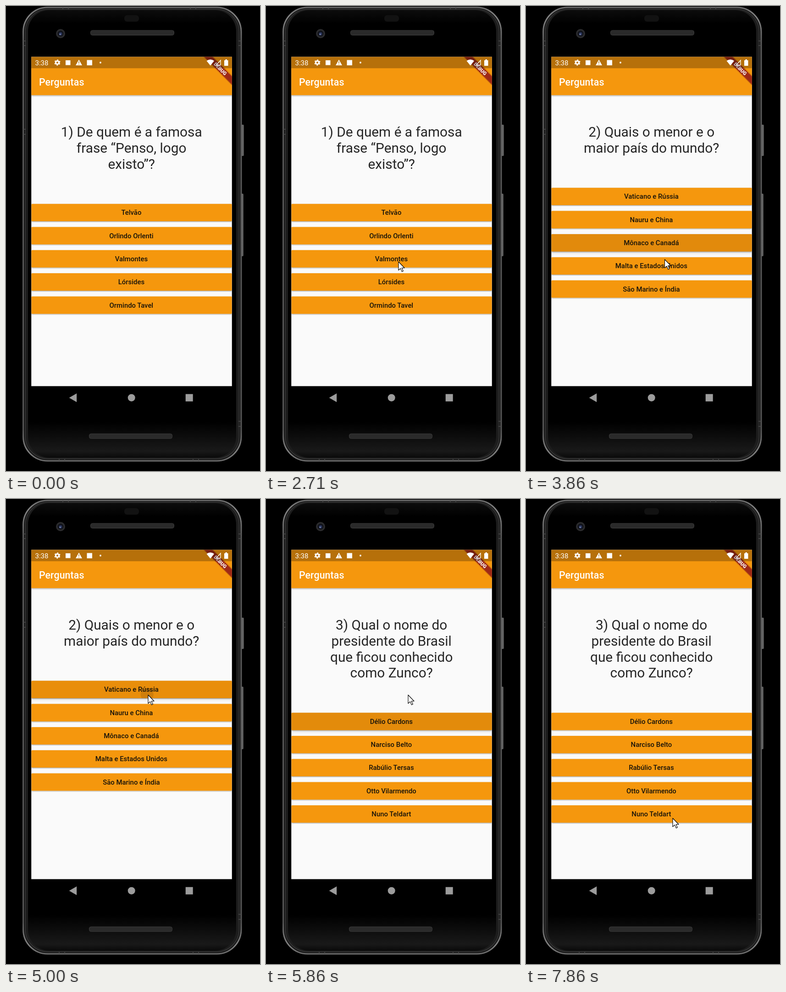
An HTML page for the animation above (8 s loop, 554 px wide and 1011 px high).

```html
<!DOCTYPE html>
<html lang="pt">
<head>
<meta charset="utf-8">
<title>Perguntas</title>
<style>
  html, body { margin: 0; width: 100%; height: 100%; overflow: hidden; background: #000; }
  svg { display: block; width: 554px; height: 1011px; font-family: Roboto, sans-serif; }
  .question { font-size: 29.8px; fill: #262626; text-anchor: middle; }
  .label { font-size: 14.9px; font-weight: 500; fill: #16120a; text-anchor: middle; }
</style>
</head>
<body>
<svg viewBox="0 0 554 1011">
  <defs>
    <linearGradient id="glass" x2="0" y2="1">
      <stop offset="0" stop-color="#0c0c0c"/><stop offset=".03" stop-color="#000"/>
      <stop offset=".92" stop-color="#000"/><stop offset=".985" stop-color="#191919"/>
      <stop offset="1" stop-color="#0a0a0a"/>
    </linearGradient>
    <linearGradient id="rim" x2="0" y2="1">
      <stop offset="0" stop-color="#6c6c6c"/><stop offset=".02" stop-color="#858585"/>
      <stop offset=".08" stop-color="#5c5c5c"/><stop offset=".93" stop-color="#565656"/>
      <stop offset=".98" stop-color="#808080"/><stop offset="1" stop-color="#6a6a6a"/>
    </linearGradient>
    <linearGradient id="key"><stop stop-color="#2c2c2c"/><stop offset=".6" stop-color="#6e6e6e"/><stop offset="1" stop-color="#4a4a4a"/></linearGradient>
    <pattern id="mesh" width="3" height="3" patternUnits="userSpaceOnUse">
      <rect width="3" height="3" fill="#303030"/><rect width="1.5" height="1.5" fill="#181818"/>
    </pattern>
    <clipPath id="screen"><rect x="55.2" y="110.6" width="437.6" height="716"/></clipPath>
    <filter id="barShadow" x="-5%" y="-20%" width="110%" height="150%"><feDropShadow dx="0" dy="1.5" stdDeviation="1.8" flood-opacity=".32"/></filter>
    <filter id="flat" x="-5%" y="-30%" width="110%" height="170%"><feDropShadow dx="0" dy="1" stdDeviation="1.2" flood-opacity=".42"/></filter>
    <filter id="raised" x="-5%" y="-30%" width="110%" height="190%"><feDropShadow dx="0" dy="3" stdDeviation="3" flood-opacity=".4"/></filter>
    <filter id="soft"><feDropShadow dx="0" dy="0" stdDeviation="2.5" flood-opacity=".45"/></filter>
  </defs>

  <!-- phone body -->
  <g fill="url(#key)">
    <rect x="511" y="258" width="8" height="68" rx="2"/>
    <rect x="511" y="408" width="7" height="136" rx="2"/>
  </g>
  <rect x="37.5" y="3" width="475.5" height="986" rx="53" fill="#161616" stroke="url(#rim)" stroke-width="3"/>
  <rect x="42" y="7" width="466.5" height="977.5" rx="49" fill="#1d1d1d" stroke="#383838" stroke-width="1.5"/>
  <rect x="48" y="9" width="454" height="973" rx="46" fill="url(#glass)"/>
  <path stroke="#4c4c4c" stroke-width="1.5" d="M37 76h6M37 86h6M507 76h6M507 86h6M37 268h6M37 279h6M507 903h6M507 914h6M124 3v4M136 3v4M402 3v4M414 3v4M116 985v4M128 985v4M408 985v4M420 985v4"/>
  <rect x="258" y="20" width="32" height="14" rx="6" fill="#121212"/>
  <circle cx="119" cy="60" r="10" fill="#2b2b2d"/>
  <circle cx="119" cy="60" r="6.5" fill="#11131a"/>
  <circle cx="119" cy="60.5" r="3.5" fill="#29345a"/>
  <circle cx="118" cy="61.5" r="1.5" fill="#808cb0"/>
  <g fill="url(#mesh)" stroke="#3a3a3a">
    <rect x="184.5" y="53" width="182" height="10.5" rx="4"/>
    <rect x="181.5" y="930" width="181" height="10.5" rx="4"/>
  </g>

  <g clip-path="url(#screen)">
    <rect x="55" y="110" width="439" height="717" fill="#fafafa"/>
    <g id="content"></g>
    <rect x="55" y="105" width="439" height="88.8" fill="#f5970a" filter="url(#barShadow)"/>
    <text x="72" y="172.5" font-size="21.3" font-weight="500" fill="#fff" letter-spacing=".1">Perguntas</text>
    <g transform="translate(493 111) rotate(45)">
      <rect x="-50" y="29.8" width="100" height="12.8" fill="#971a1a" fill-opacity=".8" filter="url(#soft)"/>
      <text y="40.1" font-size="10.8" font-weight="900" fill="#fff" text-anchor="middle">DEBUG</text>
    </g>
    <rect x="55" y="110" width="439" height="25.3" opacity=".26"/>
    <!-- status icons -->
    <g fill="#fff">
      <text x="63.5" y="128.7" font-size="15">3:38</text>
      <circle cx="112" cy="123" r="3.6" fill="none" stroke="#fff" stroke-width="3"/>
      <circle cx="112" cy="123" r="5.6" fill="none" stroke="#fff" stroke-width="2" stroke-dasharray="2.9 2.964" transform="rotate(15 112 123)"/>
      <rect x="130" y="118" width="10.5" height="10.5"/>
      <path d="M159 116.5l7 12.5h-14z"/>
      <path d="M159 120.5v4M159 126v1.5" stroke="#b57006" stroke-width="1.5"/>
      <rect x="176.5" y="117.5" width="11.5" height="11.5"/>
      <circle cx="206" cy="123" r="1.9"/>
      <path d="M437.5 119.3q8.2-6 16.5 0l-8.2 10.2z"/>
      <path d="M458.5 128.5l9.500-10.500v10.500z" fill="none" stroke="#fff" stroke-width="1.3"/>
      <path d="M476 118h2.500v-2h3.500v2h2.500v12h-8.500z"/>
    </g>
  </g>

  <g fill="#9c9c9c">
    <path d="M137.700 851.700l16.500-9.500v19z"/>
    <circle cx="273.700" cy="851.700" r="8"/>
    <rect x="391.700" y="843.700" width="16" height="16"/>
  </g>
  <path id="cursor" d="M0 0V18.500L4.400 14.600L7.500 21.600L10.300 20.300L7.200 13.500H13Z" fill="#fff" stroke="#000" stroke-width="1.1" stroke-linejoin="round"/>
</svg>

<script>
const LOOP = 8000, RATE = 7 / 1000, LAST = 55;
const LEFT = 55.2, WIDTH = 437.6, CENTER = 273.7, PITCH = 50.3, HEIGHT = 37.8;

const pages = [
  { top: 430.2, lines: ['1) De quem é a famosa', 'frase “Penso, logo', 'existo”?'],
    answers: ['Telvão', 'Orlindo Orlenti', 'Valmontes', 'Lórsides', 'Ormindo Tavel'] },
  { top: 395.3, lines: ['2) Quais o menor e o', 'maior país do mundo?'],
    answers: ['Vaticano e Rússia', 'Nauru e China', 'Mônaco e Canadá', 'Malta e Estados Unidos', 'São Marino e Índia'] },
  { top: 464.7, lines: ['3) Qual o nome do', 'presidente do Brasil', 'que ficou conhecido', 'como Zunco?'],
    answers: ['Délio Cardons', 'Narciso Belto', 'Rabúlio Tersas', 'Otto Vilarmendo', 'Nuno Teldart'] }
];

// each press advances to the next page on release
const presses = [
  { row: 2, down: 3020, up: 3718, x: 311, y: 556 },
  { row: 0, down: 4936, up: 5716, x: 310, y: 426 }
];

// pointer stops: time, x, y
const stops = [
  [428, 330, 880], [857, 307, 646], [1714, 307, 646], [2143, 288, 630],
  [2286, 288, 630], [2710, 289, 556], [2857, 289, 556], [3000, 302.5, 551],
  [4000, 302.5, 551], [4571, 304, 427], [4714, 310, 426], [6000, 310, 426],
  [7143, 289, 570], [7286, 289, 570], [7571, 306, 703], [7714, 306, 703], [7857, 320, 694]
];

const content = document.getElementById('content');
const cursor = document.getElementById('cursor');
const clamp = v => Math.max(0, Math.min(1, v));
const mix = (a, b, k) => a + (b - a) * k;

const bar = (y, attrs) => `<rect x="${LEFT}" y="${y}" width="${WIDTH}" height="${HEIGHT}" rx="2" ${attrs}/>`;

// raised shadow, darkening and spreading circle of a pressed button
function ink(press, time, y) {
  const held = Math.min(time, press.up) - press.down;
  const released = Math.max(0, time - press.up);
  const fade = 1 - clamp(released / 200);
  const depth = fade * clamp(held / 200);
  const grown = clamp((held * 0.22 + released) / 220);
  const cx = mix(press.x, CENTER, grown), cy = mix(press.y, y + HEIGHT / 2, grown);
  return bar(y, `fill="#f5970a" filter="url(#raised)" opacity="${depth}"`) +
    `<clipPath id="edge">${bar(y, '')}</clipPath>
    <g clip-path="url(#edge)">
      ${bar(y, `opacity="${0.16 * depth}"`)}
      <circle cx="${cx}" cy="${cy}" r="${grown * 220}" opacity="${0.11 * fade}"/>
    </g>`;
}

function button(label, row, top, press, time) {
  const y = top + row * PITCH;
  return bar(y, 'fill="#f5970a" filter="url(#flat)"') +
    (press && press.row === row ? ink(press, time, y) : '') +
    `<text class="label" x="${CENTER - 0.3}" y="${y + 24.1}">${label}</text>`;
}

function drawPage(time) {
  const page = pages[presses.filter(p => time >= p.up).length];
  const press = presses.find(p => time >= p.down && time < p.up + 200);
  content.innerHTML =
    page.lines.map((s, i) => `<text class="question" x="${CENTER}" y="${284.2 + i * 34.75}">${s}</text>`).join('') +
    page.answers.map((s, i) => button(s, i, page.top, press, time)).join('');
}

function drawCursor(time) {
  const next = stops.findIndex(s => s[0] > time);
  cursor.style.display = next === 0 ? 'none' : '';
  if (next === 0) return;
  const b = stops[next < 0 ? stops.length - 1 : next];
  const a = next < 0 ? b : stops[next - 1];
  const k = a === b ? 0 : (time - a[0]) / (b[0] - a[0]);
  cursor.setAttribute('transform', `translate(${mix(a[1], b[1], k)} ${mix(a[2], b[2], k)})`);
}

let shown = -1;
const start = performance.now();

function tick(now) {
  const elapsed = Math.max(0, now - start) % LOOP;
  const step = Math.min(LAST, Math.floor((elapsed + 5) * RATE));
  if (step !== shown) {
    shown = step;
    drawPage(step / RATE);
    drawCursor(step / RATE);
  }
  requestAnimationFrame(tick);
}
tick(start);
</script>
</body>
</html>
```
